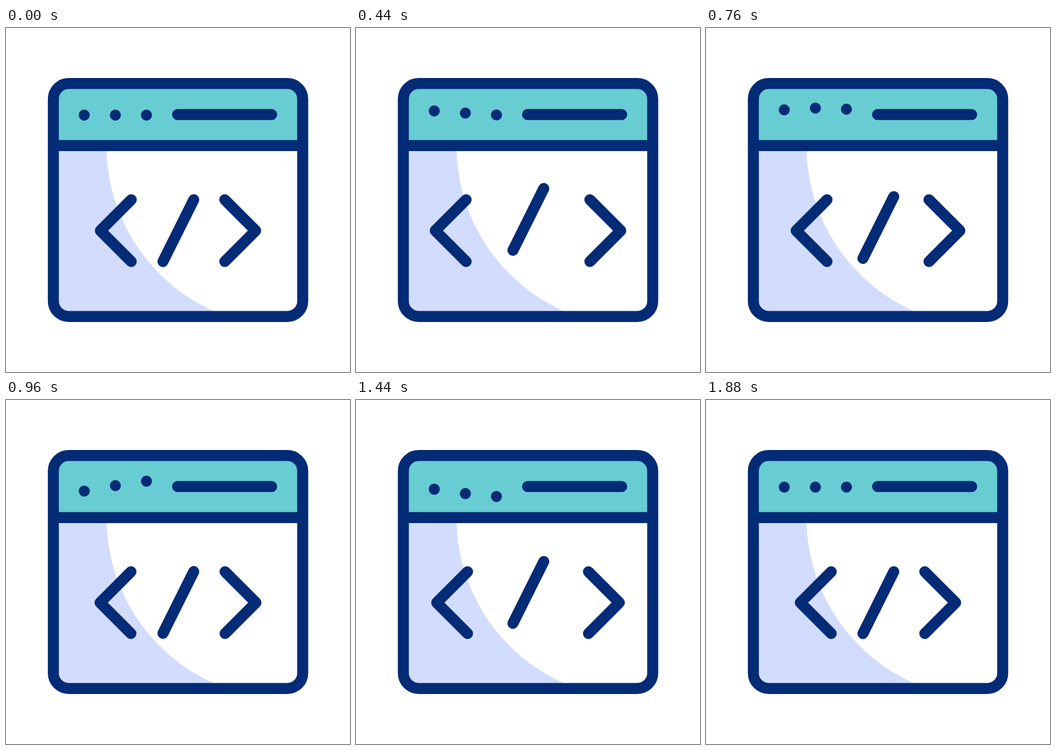
An HTML page for the animation above (1.92 s loop, 640 px wide and 640 px high).

```html
<!DOCTYPE html>
<html lang="en">
<head>
<meta charset="utf-8">
<title>Code window</title>
<style>
  html, body { margin: 0; width: 100%; height: 100%; overflow: hidden; background: #fff; }
  svg { display: block; width: 100%; height: 100%; }
  .ink { fill: none; stroke: #042b76; stroke-width: 20.5; stroke-linecap: round; stroke-linejoin: round; }
  .dot { fill: #042b76; }
</style>
</head>
<body>
<svg viewBox="0 0 640 640">
  <path fill="#68cdd2" d="M88 219V131a28 28 0 0 1 28-28H524a28 28 0 0 1 28 28V219Z"/>
  <path fill="#d2dcfd" d="M88 219H187A337 337 0 0 0 387 527V537H116a28 28 0 0 1-28-28Z"/>
  <g class="ink">
    <rect x="88.1" y="103.3" width="463.9" height="433.4" rx="28.5"/>
    <path d="M88 218.8H552M319.2 161H494.3"/>
    <path id="left" d="M233 319.5L175.5 377L233 434.5"/>
    <path id="slash" d="M349.3 319.5L292 434.5"/>
    <path id="right" d="M407 319.5L464.5 377L407 434.5"/>
  </g>
  <circle class="dot" cx="145.6" cy="162" r="10.3"/>
  <circle class="dot" cx="203.5" cy="162" r="10.3"/>
  <circle class="dot" cx="261.3" cy="162" r="10.3"/>
</svg>
<script>
const LOOP = 1920, STEP = 40;
const dots = document.querySelectorAll('.dot');

// Keys are [time, value] pairs, eased in and out between neighbours.
const spread = [[100, 0], [480, 29], [905, 0], [910, 0], [1500, 26.2], [1880, 0]];
const bounce = times => times.map((t, i) => [t, [0, -13, 18.2, 0][i]]);
const waves = [
  bounce([160, 660, 1155, 1560]),
  bounce([265, 765, 1275, 1700]),
  bounce([395, 880, 1395, 1800])
];

function valueAt(keys, t) {
  if (t <= keys[0][0]) return keys[0][1];
  for (let i = 1; i < keys.length; i++) {
    const [t0, a] = keys[i - 1], [t1, b] = keys[i];
    if (t < t1) {
      const u = (t - t0) / (t1 - t0);
      return a + (b - a) * u * u * (3 - 2 * u);
    }
  }
  return keys[keys.length - 1][1];
}

function move(el, x, y) {
  el.setAttribute('transform', `translate(${x} ${y})`);
}

function draw(now) {
  const t = Math.floor(now % LOOP / STEP) * STEP;
  const d = valueAt(spread, t);
  move(document.getElementById('left'), -d, 0);
  move(document.getElementById('right'), d, 0);
  move(document.getElementById('slash'), 0, -0.745 * d);
  dots.forEach((dot, i) => move(dot, 0, valueAt(waves[i], t)));
}

const start = performance.now();
function tick() {
  draw(performance.now() - start);
  requestAnimationFrame(tick);
}
tick();
</script>
</body>
</html>
```
